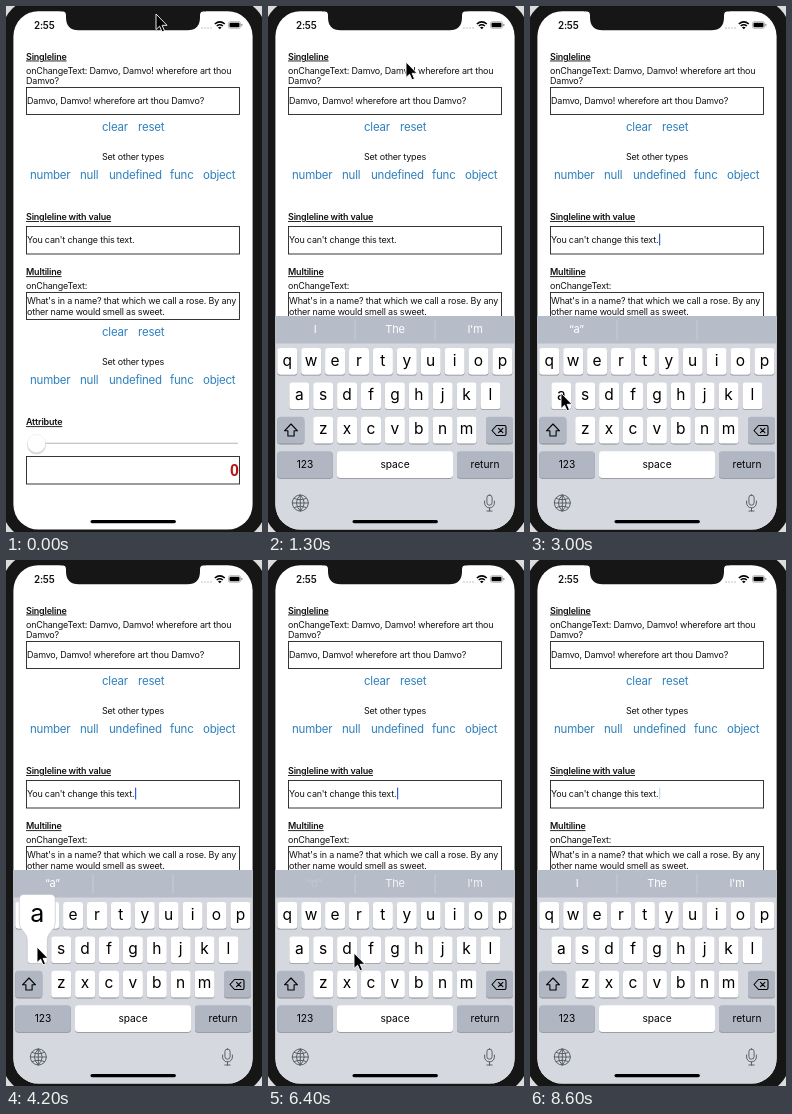
An HTML page that plays this animation: 256x526 px, repeating every 8700 ms.

```html
<!DOCTYPE html>
<html lang="en">
<head>
<meta charset="utf-8">
<title>Text input demo</title>
<style>
  html, body { margin: 0; width: 100%; height: 100%; overflow: hidden; background: #dcdcdc; }
  svg { display: block; width: 256px; height: 526px; }
  text { font-family: Inter, Roboto, sans-serif; font-size: 8.96px; letter-spacing: -.02em; fill: #111; white-space: pre; }
  .title { font-weight: 600; text-decoration: underline; }
  .link { font-size: 11.5px; fill: #2f80bd; }
  .mid { text-anchor: middle; }
  .box { fill: none; stroke: #222; stroke-width: .9; }
  .key { font-size: 15.5px; letter-spacing: 0; text-anchor: middle; fill: #000; }
  .label { font-size: 10.2px; letter-spacing: 0; text-anchor: middle; fill: #000; }
  .word { font-size: 11px; text-anchor: middle; fill: #fff; }
  .line, .icon { fill: none; stroke: #50555c; stroke-width: .9; stroke-linecap: round; stroke-linejoin: round; }
  .icon { stroke: #000; stroke-width: 1.1; }
</style>
</head>
<body>
<script>
const LOOP = 8700, STEP = 100;
const KEYBOARD_HEIGHT = 214;

const text = (x, y, s, cls = '', more = '') => `<text x="${x}" y="${y}" class="${cls}" ${more}>${s}</text>`;
const rect = (x, y, w, h, r, fill, more = '') =>
  `<rect x="${x}" y="${y}" width="${w}" height="${h}" rx="${r}" fill="${fill}" ${more}/>`;
const box = (y, h) => `<rect x="20.5" y="${y}" width="213" height="${h}" class="box"/>`;
const path = (d, more = 'class="line"') => `<path d="${d}" ${more}/>`;

// Page content

const buttons = y =>
  text(96, y, 'clear', 'link') + text(132, y, 'reset', 'link') +
  text(127, y + 29, 'Set other types', 'mid') +
  [[24, 'number'], [74, 'null'], [103, 'undefined'], [164, 'func'], [197, 'object']]
    .map(([x, s]) => text(x, y + 47.7, s, 'link')).join('');

const page = [
  text(20, 53.5, 'Singleline', 'title'),
  text(20, 68, 'onChangeText: Damvo, Damvo! wherefore art thou'),
  text(20, 78.4, 'Damvo?'),
  box(81.5, 27),
  text(21, 97.6, 'Damvo, Damvo! wherefore art thou Damvo?'),
  buttons(125),
  text(20, 214, 'Singleline with value', 'title'),
  box(220.5, 27.5),
  text(21, 237, "You can't change this text."),
  rect(129, 227.5, 1.2, 12, .6, '#2f5fd8', 'id="caret"'),
  text(20, 269.2, 'Multiline', 'title'),
  text(20, 283, 'onChangeText:'),
  box(286.5, 27),
  text(21, 298.2, "What's in a name? that which we call a rose. By any"),
  text(21, 308.9, 'other name would smell as sweet.'),
  buttons(329.8),
  text(20, 419.2, 'Attribute', 'title'),
  rect(30, 436.7, 202, 1, .5, '#b5b5b5'),
  '<circle cx="30.5" cy="439" r="9.6" fill="#000" opacity=".14"/>',
  '<circle cx="30.5" cy="437.4" r="9" fill="#fff" stroke="#ddd" stroke-width=".4"/>',
  box(450.5, 27.5),
  text(232.5, 470.3, '0', '', 'text-anchor="end" style="font:bold 16px Liberation Sans,sans-serif;fill:#b81414"')
].join('');

// Keyboard

const keyCap = (x, y, w, fill = '#fff') =>
  rect(x, y + .8, w, 26.8, 3.2, '#898c92') + rect(x, y, w, 26.8, 3.2, fill);

const rows = [['qwertyuiop', 19.3, 342], ['asdfghjkl', 31.3, 376.4], ['zxcvbnm', 55.2, 410.8]];
const keyPos = {};
for (const [letters, x, y] of rows)
  [...letters].forEach((c, i) => keyPos[c] = [x + i * 23.9, y]);

const letterKeys = Object.entries(keyPos)
  .map(([c, [x, y]]) => keyCap(x - 10, y, 20) + text(x, y + 17.6, c, 'key')).join('');

const GREY = '#b0b7c2';
const keyboard = [
  rect(7, 310, 240, KEYBOARD_HEIGHT, 0, '#d5d8de'),
  rect(7, 310, 240, 27.5, 0, '#b6bdc9'),
  rect(86.7, 314, .7, 20, 0, '#cfd4dc'),
  rect(166.7, 314, .7, 20, 0, '#cfd4dc'),
  text(47, 326.5, 'I', 'word', 'id="first"'),
  text(46.5, 326.5, '', 'word', 'id="quote"'),
  '<g id="words">', text(127, 326.5, 'The', 'word'), text(207, 326.5, "I'm", 'word'), '</g>',
  letterKeys,
  keyCap(9.3, 410.8, 27, GREY), keyCap(218, 410.8, 27, GREY),
  path('M23 418l6.5 6.8h-3.400v5.200h-6.200v-5.200h-3.400z', 'class="icon"'),
  path('M228.500 419.500h8q1.500 0 1.500 1.500v7q0 1.500-1.500 1.500h-8l-4.500-5zM230.500 422.300l4.400 4.400m0-4.400l-4.400 4.400', 'class="icon"'),
  keyCap(9.3, 445.2, 55.5, GREY), keyCap(69, 445.2, 116), keyCap(189, 445.2, 56, GREY),
  text(37, 462.3, '123', 'label'), text(127, 462.3, 'space', 'label'), text(217, 462.3, 'return', 'label'),
  path('M24.3 497a8 8 0 1 0 16 0a8 8 0 1 0-16 0h16M32.3 489v16M32.3 489q-8 8 0 16M32.3 489q8 8 0 16M26 492.3q6.3 3 12.6 0M26 501.7q6.3-3 12.6 0'),
  path('M221.5 489a2.6 2.6 0 0 1 2.6 2.6v5a2.6 2.6 0 0 1-5.2 0v-5a2.6 2.6 0 0 1 2.6-2.6zM216.6 495v2a4.9 4.9 0 0 0 9.8 0v-2M221.5 502v3m-2.6 0h5.2'),
  '<g id="popup">',
  path('M-13 -42H13Q18 -42 18 -37V-14Q18 -9 14 -5Q10 -1 10 3V24Q10 27 7 27H-7Q-10 27 -10 24V3Q-10 -1 -14 -5Q-18 -9 -18 -14V-37Q-18 -42 -13 -42Z',
    'fill="#fff" stroke="#b9bdc5" stroke-width=".6"'),
  text(0, -14.3, '', 'key', 'id="big" style="font-size:25px"'),
  '</g>'
].join('');

// Phone

const BEZEL = '#161616';
const SCREEN = 'x="7.4" y="5.2" width="239.200" height="518.400" rx="25"';
const notch = 'M54 4V5.200H56Q60 5.200 60 9.200V11.500Q60 24.200 72.700 24.200H181.300Q194 24.200 194 11.500V9.200Q194 5.200 198 5.200H200V4Z';
const dots = [196, 199, 202, 205].map(x => `<circle cx="${x}" cy="22" r=".65" fill="#aaa"/>`).join('');

document.body.innerHTML = `<svg viewBox="0 0 256 526">
  <clipPath id="screen"><rect ${SCREEN}/></clipPath>
  ${rect(-4, -7, 264, 541, 34, BEZEL)}
  <rect ${SCREEN} fill="#fff"/>
  ${page}
  <g clip-path="url(#screen)"><g id="keyboard">${keyboard}</g></g>
  ${path(notch, `fill="${BEZEL}"`)}
  ${text(28, 22.6, '2:55', '', 'style="font-size:9.8px;font-weight:600"')}
  ${dots}
  ${path('M208.800 18q5-4.300 10 0M210.700 20q3.100-2.500 6.200 0', 'fill="none" stroke="#000" stroke-width="1.5"')}
  ${path('M212 21.500q1.800-1.400 3.600 0l-1.800 1.800z', 'fill="#000"')}
  ${rect(222.5, 15.7, 12, 6.6, 1.7, 'none', 'stroke="#888" stroke-width=".6"')}
  ${rect(223.5, 16.7, 10, 4.6, 1, '#000')}
  ${rect(235.3, 17.8, 1, 2.4, .5, '#888')}
  ${rect(84.5, 514, 85.4, 3.2, 1.6, '#000')}
  ${path('M0 0V15.500L3.600 12.200L6 17.800L8.500 16.800L6.100 11.300H11Z', 'id="cursor" fill="#000" stroke="#fff" stroke-width=".9" stroke-linejoin="round"')}
</svg>`;

// Timeline

const cursorTrack = [
  [1200, 150, 8], [1300, 138, 56], [1600, 139, 165], [2000, 38, 375], [2100, 31, 387],
  [4700, 31, 387], [5200, 60, 396], [5500, 60, 396], [5900, 86, 393], [6500, 86, 393],
  [7100, 246, 438], [7700, 248, 432], [8200, 250, 480], [8500, 260, 493]
];
const wordsTrack = [
  [2700, 1], [2820, 0], [3300, 0], [3420, 1], [3600, 1], [3720, 0],
  [4800, 0], [4920, 1], [5300, 1], [5420, 0], [6300, 0], [6420, 1]
];
const presses = [[2700, 'a'], [3600, 'a'], [4150, 'a'], [5300, 's'], [6000, 'd']];
const FOCUS = 350;

const clamp = v => Math.min(1, Math.max(0, v));

function sample(track, t) {
  const next = track.findIndex(k => k[0] > t);
  if (next === 0) return track[0].slice(1);
  if (next < 0) return track[track.length - 1].slice(1);
  const a = track[next - 1], b = track[next];
  const p = (t - a[0]) / (b[0] - a[0]);
  return a.slice(1).map((v, i) => v + (b[i + 1] - v) * p);
}

function caretOpacity(t, since) {
  if (t < FOCUS) return 0;
  const phase = (t - since) % 1000;
  return phase < 800 ? clamp((650 - phase) / 200) : clamp((phase - 950) / 50);
}

const el = id => document.getElementById(id);
const fade = (id, v) => el(id).setAttribute('opacity', v);
const move = (id, x, y) => el(id).setAttribute('transform', `translate(${x} ${y})`);

function draw(t) {
  const rise = 1 - Math.pow(1 - clamp((t - 750) / 500), 2.1);
  move('keyboard', 0, (1 - rise) * KEYBOARD_HEIGHT);
  fade('keyboard', .88 + .12 * rise);

  const [time, letter] = presses.filter(p => p[0] <= t).pop() || [FOCUS, ''];
  fade('caret', caretOpacity(t, time));

  const pressed = letter && t - time < 200;
  fade('popup', pressed ? 1 : 0);
  if (pressed) {
    move('popup', ...keyPos[letter]);
    el('big').textContent = letter;
  }

  const [words] = sample(wordsTrack, t);
  fade('words', words);
  fade('first', words === 1 ? 1 : 0);
  fade('quote', 1 - words);
  el('quote').textContent = letter && `“${letter}”`;

  move('cursor', ...sample(cursorTrack, t));
}

const start = performance.now();
function tick() {
  const t = (performance.now() - start) % LOOP;
  draw(Math.floor(t / STEP) * STEP);
  requestAnimationFrame(tick);
}
tick();
</script>
</body>
</html>
```
